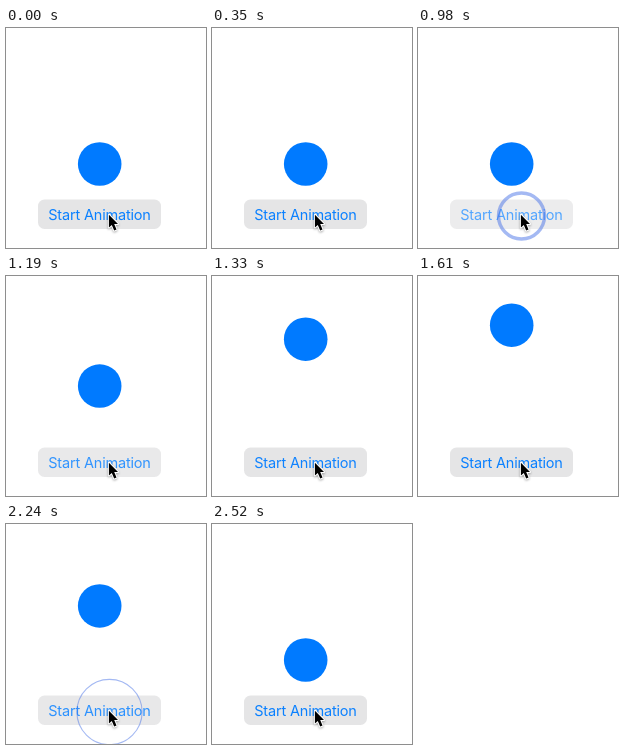
These frames come from a looping animation (200 by 220 pixels, 2590 ms). An HTML page:

```html
<!DOCTYPE html>
<html lang="en">
<head>
<meta charset="utf-8">
<title>Start Animation</title>
<style>
  html, body { margin: 0; height: 100%; overflow: hidden; background: #fff; }
  svg { display: block; width: 200px; height: 220px; }
  text { font: 14.5px Inter, Roboto, sans-serif; letter-spacing: -.18px; text-anchor: middle; }
  #cursor { filter: drop-shadow(0 1px .8px #0005); }
</style>
</head>
<body>
<svg viewBox="0 0 200 220">
  <circle id="ball" cx="93.7" cy="136" r="21.8" fill="#007aff"/>
  <g id="button">
    <rect x="32" y="171.5" width="123" height="29.5" rx="6.5" fill="#e5e5e6"/>
    <text x="93.5" y="192" fill="#0a80ff">Start Animation</text>
  </g>
  <circle id="ring" cx="103.5" cy="188" fill="none" stroke="#4a74e8"/>
  <path id="cursor" d="M102.9 186.7V199.6L105.8 196.9L108.2 202.5L110.5 201.5L108.2 196H112Z"
    fill="#000" stroke="#fff" stroke-width="2" paint-order="stroke" stroke-linejoin="round"/>
</svg>
<script>
const LOOP = 2590, STEP = 70, LOW = 136, HIGH = 49.2;
const clicks = [
  { down: 840, release: 1000, move: 1050 },
  { down: 1960, release: 2120, move: 2080 }
];
const [ball, button, ring] = ['ball', 'button', 'ring'].map(id => document.getElementById(id));

const progress = (t, start, length) => Math.min(1, Math.max(0, (t - start) / length));
const ease = x => (1 - Math.cos(Math.PI * x)) / 2;
const mix = (a, b, p) => a + (b - a) * p;

function draw(t) {
  const [rise, fall] = clicks.map(c => ease(progress(t, c.move, 380)));
  ball.setAttribute('cy', mix(LOW, HIGH, rise - fall));

  const click = clicks.findLast(c => t >= c.down);
  const spread = click ? progress(t, click.release, 150) : 1;
  button.setAttribute('opacity', click ? mix(.7, 1, progress(t, click.move, 300)) : 1);
  ring.setAttribute('r', mix(23, 35, spread));
  ring.setAttribute('stroke-width', mix(3.4, .5, spread));
  ring.setAttribute('opacity', spread < 1 ? .5 : 0);
}

// The picture moves in steps of 70 ms.
function tick() {
  const t = performance.now() % LOOP;
  draw(Math.floor(t / STEP) * STEP);
  requestAnimationFrame(tick);
}
tick();
</script>
</body>
</html>
```
